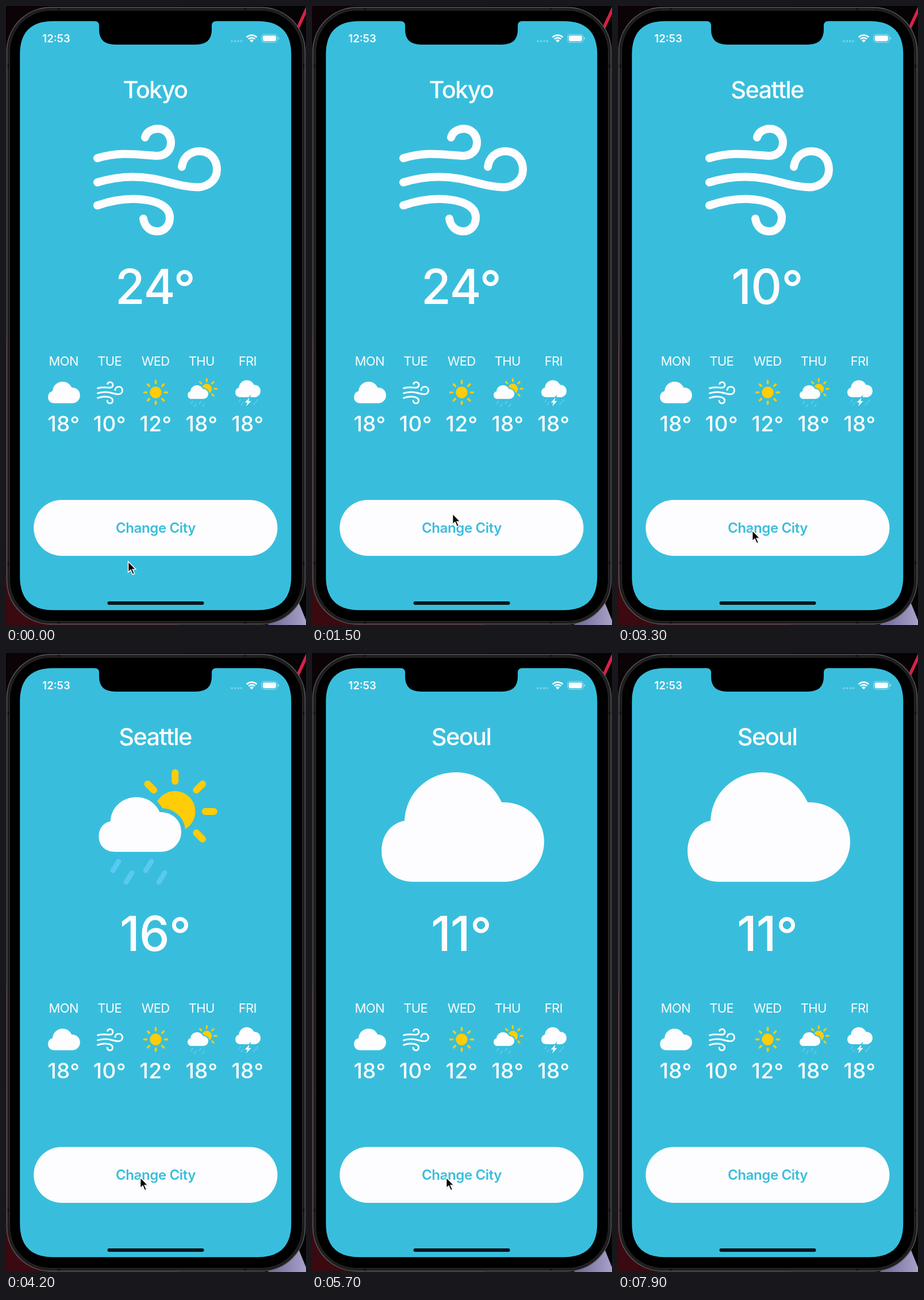
An HTML page that plays this animation: 522 px wide and 1074 px high, repeating every 8000 ms.

```html
<!DOCTYPE html>
<html lang="en">
<head>
<meta charset="utf-8">
<title>Weather</title>
<style>
  html, body { margin: 0; width: 100%; height: 100%; overflow: hidden; background: #050304; }
  svg { display: block; width: 100%; height: 100%; }
  text { font-family: Inter, Roboto, sans-serif; font-optical-sizing: none; fill: #fdfcfe; text-anchor: middle; }
  .city { font-size: 41.5px; font-weight: 500; letter-spacing: -.04em; }
  .temp { font-size: 84px; font-weight: 500; letter-spacing: -.012em; }
  .day { font-size: 22px; letter-spacing: -.03em; }
  .low { font-size: 37px; font-weight: 500; letter-spacing: .01em; }
  .label { font-size: 24px; font-weight: 600; letter-spacing: -.015em; fill: #38bedc; }
  .clock { font-size: 18.5px; font-weight: 600; }
  .line { fill: none; stroke-linecap: round; stroke-linejoin: round; }
</style>
</head>
<body>
<svg viewBox="0 0 522 1074" preserveAspectRatio="none">
  <defs>
    <linearGradient id="wall" x2="0" y2="1">
      <stop offset="0" stop-color="#0b0306"/>
      <stop offset=".53" stop-color="#0b0306"/>
      <stop offset=".55" stop-color="#3a0d18"/>
      <stop offset="1" stop-color="#3b0a10"/>
    </linearGradient>
    <linearGradient id="glow">
      <stop offset="0" stop-color="#6d6698"/>
      <stop offset="1" stop-color="#a8a2c8"/>
    </linearGradient>
    <path id="cloudShape" d="M177 397C143 397 121 375 121 344C121 315 138 295 161 291C163 242 203 207 250 207C285 207 315 226 330 259C373 258 404 288 404 327C404 367 373 397 334 397Z"/>
    <g id="cloud"><use href="#cloudShape" fill="#fdfcfe"/></g>
    <g id="wind" class="line" stroke="#fdfcfe" stroke-width="14">
      <path d="M159 264C196 253 222 257 262 260C277 260 287 251 287 237C287 223 277 213 264 213C252 213 244 220 242 228"/>
      <path d="M159 306C195 295 230 293 268 302C300 310 312 314 333 314.5C353 314 367 301 367 284C367 265 354 252 337 252C320 252 308 263 306 279"/>
      <path d="M159 346C186 337 207 334 228 335C264 337 285 348 285 367C285 381 276 391 263 391C250 391 241 382 239 369"/>
    </g>
    <g id="sun"></g>
    <g id="showers"></g>
    <g id="storm">
      <use href="#cloudShape" fill="#fdfcfe" transform="translate(421 664) scale(.155) translate(-262.5 -302)"/>
      <path class="line" stroke="#5ac8f5" stroke-width="1.9" d="M408 683l-2.6 4M412 688l-2.6 4M438 683l-2.6 4M433.5 688l-2.6 4"/>
      <path d="M423.5 679.5L415.5 688H420L418 694.5L426.5 685.5H422Z" fill="#fdfcfe" stroke="#38bedc" stroke-width="3" paint-order="stroke"/>
    </g>
  </defs>

  <rect width="522" height="1074" fill="url(#wall)"/>
  <path d="M300 0H522V1074H300Z" fill="#050304"/>
  <path d="M522 1L522 14L508 44L502 44Z" fill="#d62149"/>
  <path d="M509 1034L522 1066V1074H455Z" fill="url(#glow)"/>

  <rect x="1.5" y="2.5" width="519" height="1070" rx="76" fill="#1d1d1e" stroke="#5a5a5c" stroke-width="1.5"/>
  <path d="M2.5 104H6M516 104H519.5M2.5 967H6M516 967H519.5M92 3.5V7M416 3.5V7M92 1068V1071.5M416 1068V1071.5" stroke="#121213" stroke-width="5"/>
  <rect x="6.5" y="7.5" width="509" height="1060" rx="71" fill="#000" stroke="#2b2b2d"/>
  <path d="M82 26.2H154Q162 26.2 162 34V41Q162 67 190 67H330Q358 67 358 41V34Q358 26.2 366 26.2H438Q496.3 26.2 496.3 84V990Q496.3 1048.2 438 1048.2H82Q24.2 1048.2 24.2 990V84Q24.2 26.2 82 26.2Z" fill="#38bedc"/>

  <text class="clock" x="87.5" y="63">12:53</text>
  <g fill="#fdfcfe">
    <g opacity=".35"><circle cx="393" cy="61" r="1.8"/><circle cx="398.5" cy="61" r="1.8"/><circle cx="404" cy="61" r="1.8"/><circle cx="409" cy="61" r="1.8"/></g>
    <path d="M427.5 63.3L424 59.7A5 5 0 0 1 431 59.7Z"/>
    <path d="M418.7 54.2A12.6 12.6 0 0 1 436.3 54.2M421.8 57.4A8.2 8.2 0 0 1 433.2 57.4" fill="none" stroke="#fdfcfe" stroke-width="2.7"/>
    <rect x="444.8" y="49.3" width="27" height="13.6" rx="4" fill="none" stroke="#fdfcfe" stroke-width="1.1" opacity=".5"/>
    <rect x="446.8" y="51.2" width="23" height="9.8" rx="2.4"/>
    <path d="M473.3 53.8Q475.4 54.5 475.4 56.1T473.3 58.4Z" opacity=".55"/>
  </g>

  <text class="city" id="city" x="259.5" y="159.5"></text>
  <use id="icon"/>
  <text class="temp" x="259.5" y="517"><tspan id="temp"></tspan><tspan dy=".03em">°</tspan></text>
  <g id="week"></g>

  <rect x="48.2" y="857" width="424.2" height="97" rx="48.5" fill="#fdfcfe"/>
  <text class="label" x="260.5" y="914">Change City</text>
  <rect x="176.5" y="1033" width="168" height="6" rx="3" fill="#07151a"/>

  <g id="cursor">
    <path d="M1 2V21L5.4 17L8.6 24.5L12 23L8.8 15.8H15Z" fill="#000" opacity=".22"/>
    <path d="M.6 .8V19.6L4.9 15.6L8.3 23.4L11.6 22L8.2 14.4H14Z" fill="#080808" stroke="#fff" stroke-width="1.5"/>
  </g>
</svg>
<script>
  const LOOP = 8000, STEP = 100;
  const $ = id => document.getElementById(id);

  const rays = (x, y, from, to, width, angles) => angles.map(a =>
    `<path class="line" stroke="#ffcc08" stroke-width="${width}" d="M${from} 0H${to}" transform="translate(${x} ${y}) rotate(${a})"/>`).join('');

  const disc = (x, y, r) => `<circle cx="${x}" cy="${y}" r="${r}" fill="#ffcc08"/>`;

  $('sun').innerHTML = disc(260.5, 302, 46) +
    rays(260.5, 302, 71.5, 89.5, 16, [0, 45, 90, 135, 180, 225, 270, 315]);

  const drops = [[196, 361.5], [219, 381.5], [253, 361.5], [276, 381.5]]
    .map(([x, y]) => `M${x} ${y}l-10 16`).join('');

  $('showers').innerHTML = disc(294, 275, 35.5) +
    rays(294.2, 275, 52.5, 67.5, 12, [-135, -90, -45, 0, 45]) +
    `<use href="#cloudShape" fill="#fdfcfe" stroke="#38bedc" stroke-width="28" paint-order="stroke"
      transform="translate(233.2 297.5) scale(.507 .5) translate(-262.5 -302)"/>
    <path class="line" stroke="#5ac8f5" stroke-width="8.5" d="${drops}"/>`;

  const small = (x, y, scale, cx) => `translate(${x} ${y}) scale(${scale}) translate(${-cx} -302)`;
  const week = [
    ['MON', 'cloud', 18, small(101, 670.5, .197, 262.5)],
    ['TUE', 'wind', 10, small(181, 671, .207, 263)],
    ['WED', 'sun', 12, small(260.5, 670.5, .222, 260.5)],
    ['THU', 'showers', 18, small(342, 671, .251, 265)],
    ['FRI', 'storm', 18, '']
  ];
  $('week').innerHTML = week.map(([day, icon, low, place], i) => {
    const x = 100.5 + 80 * i;
    return `<text class="day" x="${x - .3}" y="624">${day}</text>
      <use href="#${icon}" transform="${place}"/>
      <text class="low" x="${x}" y="738">${low}<tspan dy=".03em">°</tspan></text>`;
  }).join('');

  // start time, city, icon, temperature
  const states = [
    [0, 'Tokyo', 'wind', 24],
    [2100, 'Seattle', 'wind', 10],
    [3400, 'Seattle', 'showers', 16],
    [4600, 'Seoul', 'sun', 27],
    [5600, 'Seoul', 'cloud', 11]
  ];

  // time, x, y of the pointer tip
  const track = [
    [0, 212, 963], [400, 212, 963], [1300, 244, 880], [1500, 244, 880],
    [2000, 233, 909], [5800, 233, 909], [6500, 330, 231], [6700, 330, 231], [7300, 540, 150]
  ];

  function pointer(t) {
    const i = track.findIndex(k => k[0] > t);
    if (i < 0) return track[track.length - 1].slice(1);
    const [t0, x0, y0] = track[i - 1], [t1, x1, y1] = track[i];
    const p = (t - t0) / (t1 - t0), e = p * p * (3 - 2 * p);
    return [x0 + (x1 - x0) * e, y0 + (y1 - y0) * e];
  }

  function draw(t) {
    const [, city, icon, temp] = states.filter(s => s[0] <= t).pop();
    $('city').textContent = city;
    $('icon').setAttribute('href', '#' + icon);
    $('temp').textContent = temp;
    $('cursor').setAttribute('transform', `translate(${pointer(t)})`);
  }

  const start = performance.now();
  function tick() {
    const t = (performance.now() - start) % LOOP;
    draw(Math.floor(t / STEP) * STEP);
    requestAnimationFrame(tick);
  }
  draw(0);
  requestAnimationFrame(tick);
</script>
</body>
</html>
```
